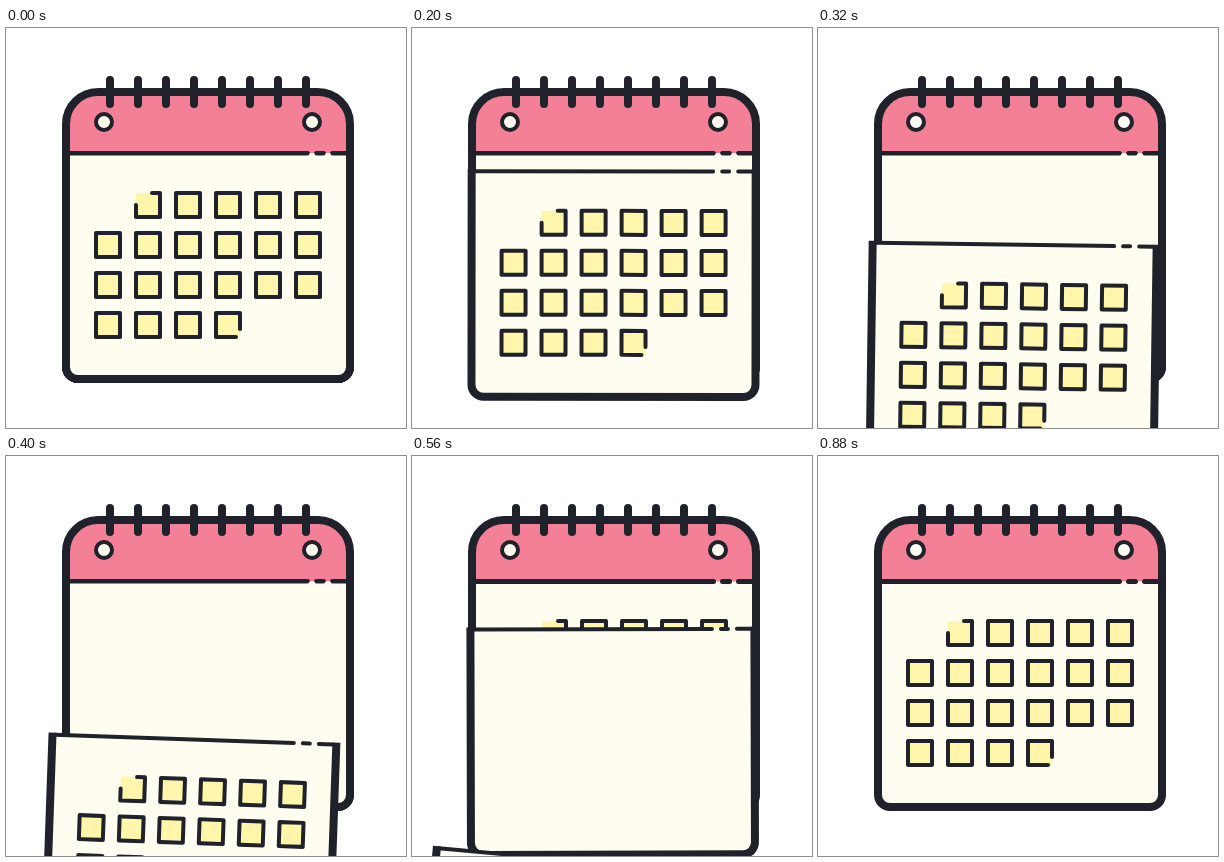
Recreate the animation shown at these times as an HTML page. Size 400 by 400 pixels, loop 1.12 s.

```html
<!DOCTYPE html>
<html lang="en">
<head>
<meta charset="utf-8">
<title>Calendar</title>
<style>
  html, body { margin: 0; width: 100%; height: 100%; overflow: hidden; background: #fff; }
  svg { display: block; width: 100vw; height: 100vh; overflow: hidden; }
  .ink { fill: none; stroke: #1f222b; stroke-width: 8; }
  .rule { stroke-width: 4; stroke-linecap: round; }
  .thick { stroke-width: 5; }
  .round { stroke-linecap: round; }
  .cell { stroke-width: 4; stroke-linejoin: round; stroke-linecap: round; fill: none; }
  .paper { fill: #fffdf0; }
  .pink { fill: #f48098; }
  .day { fill: #fff5ab; }
</style>
</head>
<body>
<svg viewBox="0 0 400 400">
  <defs>
    <path id="rule" d="M62 125.5H301.5M310.5 125.5H317.5M326.5 125.5H341"/>
    <g id="days"></g>
    <g id="sheet">
      <path class="paper" d="M60 125.5V339a12 12 0 0 0 12 12H332a12 12 0 0 0 12-12V125.5z"/>
      <path class="ink" d="M60 123.5V339a12 12 0 0 0 12 12H332a12 12 0 0 0 12-12V123.5"/>
      <use href="#rule" class="ink rule"/>
    </g>
  </defs>

  <path class="paper" d="M60 96a32 32 0 0 1 32-32H312a32 32 0 0 1 32 32V339a12 12 0 0 1-12 12H72a12 12 0 0 1-12-12z"/>
  <path class="pink" d="M60 125.5V96a32 32 0 0 1 32-32H312a32 32 0 0 1 32 32V125.5z"/>
  <use href="#rule" class="ink rule thick"/>
  <path class="ink" d="M60 96a32 32 0 0 1 32-32H312a32 32 0 0 1 32 32V339a12 12 0 0 1-12 12H72a12 12 0 0 1-12-12z"/>
  <path id="rings" class="ink round"/>
  <g class="ink" style="stroke-width:4">
    <circle class="paper" cx="98" cy="94" r="8"/>
    <circle class="paper" cx="306" cy="94" r="8"/>
  </g>
  <use href="#days"/>

  <g id="blank"><use href="#sheet"/></g>
  <g id="month"><use href="#sheet"/><use href="#days"/></g>
</svg>
<script>
  const $ = id => document.getElementById(id);
  const LOOP = 1120, STEP = 40;

  let rings = '';
  for (let i = 0; i < 8; i++) rings += `M${104 + 28 * i} 52V76`;
  $('rings').setAttribute('d', rings);

  // 22 days on a 6 x 4 grid; the first and last outlines are left open
  let days = '';
  for (let i = 1; i < 23; i++) {
    const x = 90 + 40 * (i % 6), y = 165 + 40 * Math.floor(i / 6);
    if (i > 21) break;
    const line = i === 1 ? 'm16 0h8v24h-24v-12'
      : i === 21 ? 'm20 24h-20v-24h24v16'
      : 'h24v24h-24z';
    days += `<rect class="day" x="${x}" y="${y}" width="24" height="24"/>` +
      `<path class="ink cell" d="M${x} ${y}${line}"/>`;
  }
  $('days').innerHTML = days;

  // eased drop of 316 units
  function drop(t, start, span) {
    const u = Math.min(1, Math.max(0, (t - start) / span));
    return 158 * (1 - Math.cos(Math.PI * u));
  }

  function place(id, dx, dy, angle) {
    $(id).setAttribute('transform', `translate(${dx} ${dy}) rotate(${angle} 202 240)`);
  }

  function draw(now) {
    const t = Math.floor((now % LOOP) / STEP) * STEP;

    const a = drop(t, 112, 576);
    const tilt = 2 * Math.pow(a / 158, 1.7);
    place('month', -8.8 * tilt, a, tilt);

    const b = drop(t, 432, 504);
    const swing = (b / 193) ** 2;
    place('blank', 8.3 * swing - 1.8 * Math.min(1, b / 47), b, -2.4 * swing);
  }

  const begin = performance.now();
  function tick() {
    draw(performance.now() - begin);
    requestAnimationFrame(tick);
  }
  tick();
</script>
</body>
</html>
```
